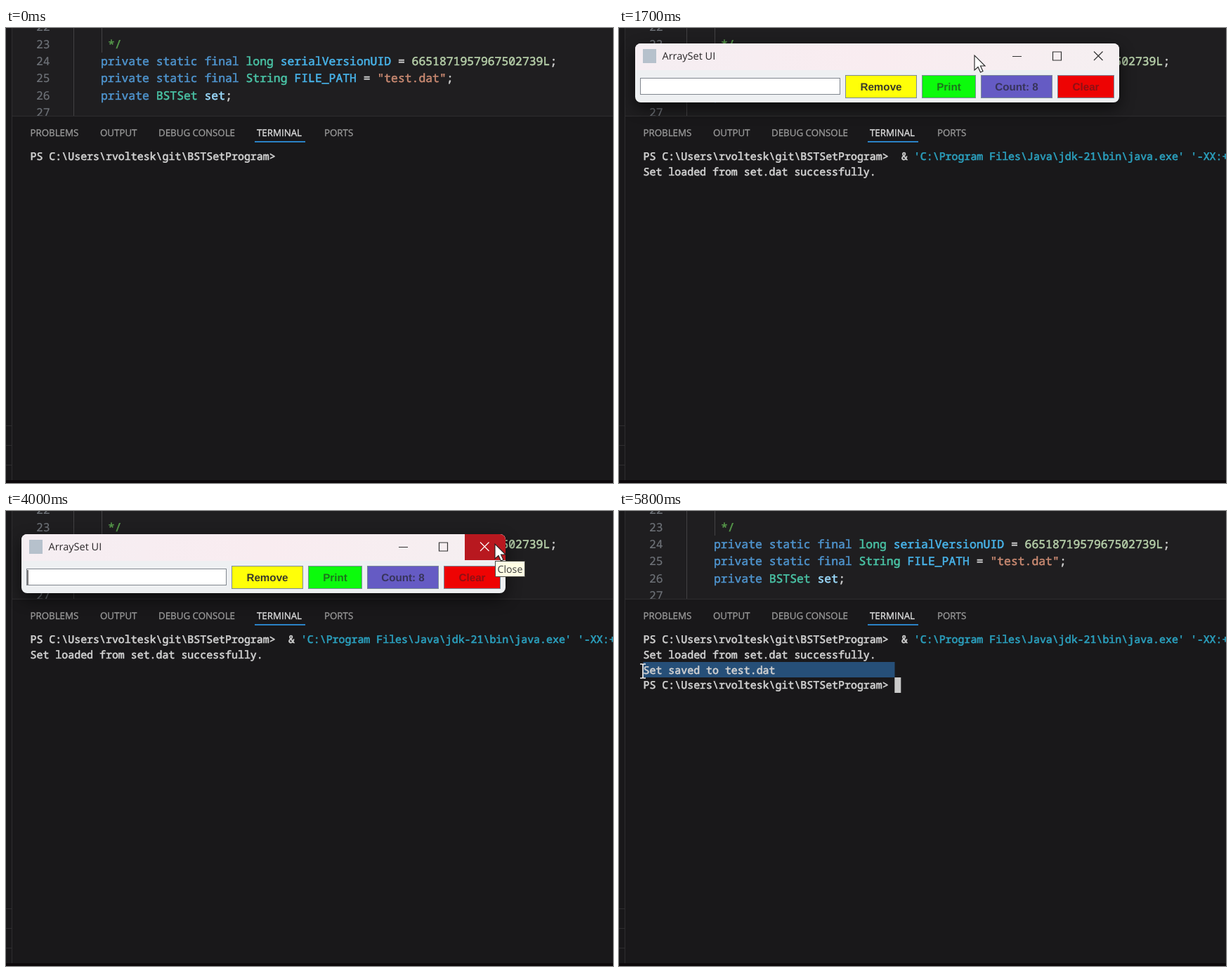
An HTML page for the animation above (5900 ms loop, 864 px wide and 648 px high).

```html
<!DOCTYPE html>
<html lang="en">
<head>
<meta charset="utf-8">
<title>Saving a set</title>
<style>
  html, body { margin: 0; width: 100%; height: 100%; overflow: hidden; background: #19181a; }
  svg { display: block; width: 864px; height: 648px; }
  text, tspan { fill: currentColor; stroke: currentColor; white-space: pre; }
  text { stroke-width: 0; text-rendering: geometricPrecision; }
  .code { font: 16.4px "Noto Sans Mono", "DejaVu Sans Mono", monospace; stroke-width: .55px; color: #d0d0d0; }
  .num { color: #6e7278; stroke-width: .2px; }
  .term { font: 14.93px "Noto Sans Mono", "DejaVu Sans Mono", monospace; color: #d0d0d0; }
  .term text { stroke-width: .65px; }
  .ui { font: 13.3px "Open Sans", "Noto Sans", sans-serif; color: #9b9b9b; }
  .tabs text { stroke-width: .3px; }
  .btn { font: bold 15.2px "Liberation Sans", Arial, sans-serif; text-anchor: middle; }
  .kw { color: #4f95cf; }
  .type { color: #4ac4a6; }
  .const { color: #48b4ea; }
  .var { color: #9cdcfe; }
  .lit { color: #b5cea8; }
  .str { color: #ca8a72; }
  .note { color: #56994a; }
  .arg { color: #2b9fbd; }
</style>
</head>
<body>
<svg viewBox="0 0 864 648">
  <defs>
    <filter id="soft" x="-20%" y="-80%" width="140%" height="260%"><feGaussianBlur stdDeviation="11"/></filter>
    <linearGradient id="bar"><stop stop-color="#f5eef2"/><stop offset=".5" stop-color="#f9ecf0"/><stop offset="1" stop-color="#f5eff1"/></linearGradient>
    <clipPath id="round"><rect width="689" height="84" rx="8"/></clipPath>
    <clipPath id="editor"><rect width="864" height="125"/></clipPath>
  </defs>

  <rect width="864" height="648" fill="#19181a"/>
  <rect x="9" width="855" height="125" fill="#1f1e20"/>
  <path d="M8.5 0V644M9 125.5H864M0 566.5H8M0 594.5H8M0 622.5H8" stroke="#2e2d2f"/>
  <rect y="644" width="864" height="4" fill="#0d090b"/>

  <g clip-path="url(#editor)">
    <path d="M96.5 0V125M136.5 0V35" stroke="#434244"/>
    <g id="numbers"></g>
    <text class="code note" x="145" y="28.7">*/</text>
    <text class="code" x="135" y="53"><tspan class="kw">private static final </tspan><tspan class="type">long </tspan><tspan class="const">serialVersionUID</tspan> = <tspan class="lit">6651871957967502739L</tspan>;</text>
    <text class="code" x="135" y="77.3"><tspan class="kw">private static final </tspan><tspan class="type">String </tspan><tspan class="const">FILE_PATH</tspan> = <tspan class="str">"test.dat"</tspan>;</text>
    <text class="code" x="135" y="101.6"><tspan class="kw">private </tspan><tspan class="type">BSTSet </tspan><tspan class="var">set</tspan>;</text>
  </g>

  <g class="ui tabs">
    <text x="34.5" y="154">PROBLEMS</text>
    <text x="134" y="154">OUTPUT</text>
    <text x="217" y="154">DEBUG CONSOLE</text>
    <text x="357" y="154" style="color:#e2e2e2">TERMINAL</text>
    <text x="453" y="154">PORTS</text>
  </g>
  <rect x="354" y="161" width="72" height="2" fill="#2b82c6"/>

  <rect id="selection" y="215" height="22" fill="#264f78"/>
  <g class="term">
    <text x="34.5" y="188.2">PS C:\Users\rvoltesk\git\BSTSetProgram&gt;</text>
    <text id="command" x="401.9" y="188.2">&amp; <tspan class="arg">'C:\Program Files\Java\jdk-21\bin\java.exe' '-XX:+ShowCode</tspan></text>
    <text id="loaded" x="34.5" y="209.9">Set loaded from set.dat successfully.</text>
    <text id="saved" x="34.5" y="231.6">Set saved to test.dat</text>
    <text id="prompt" x="34.5" y="253.3">PS C:\Users\rvoltesk\git\BSTSetProgram&gt;</text>
  </g>
  <rect id="block" width="9" height="22" fill="#cacaca"/>

  <g id="win">
    <rect y="8" width="689" height="84" rx="10" fill="#000" opacity=".6" filter="url(#soft)"/>
    <g clip-path="url(#round)">
      <rect width="689" height="84" fill="#eef0f2"/>
      <rect width="689" height="38" fill="url(#bar)"/>
      <rect id="hover" x="631" width="58" height="37" fill="#b8181f"/>
    </g>
    <rect x="11" y="8" width="19" height="20" fill="#b6c1cc"/>
    <text class="ui" x="38.5" y="23" style="font-size:14.5px;color:#2b2729">ArraySet UI</text>
    <g fill="none" stroke="#333" stroke-width="1.2">
      <path d="M537 18.5H550M594.5 12H606.5V24H594.5Z"/>
      <path id="cross" d="M653 11.5L665.5 24M665.5 11.5L653 24"/>
    </g>
    <rect x="7.5" y="49.5" width="284" height="23" fill="#fff" stroke="#80868e"/>
    <path id="caret" d="M9 51V72" stroke="#333" stroke-width="1.3"/>
    <g id="buttons"></g>
  </g>

  <g id="tip">
    <rect x="696.5" y="71.5" width="42" height="22" fill="#fffde4" stroke="#4a4a44"/>
    <text class="ui" x="699.5" y="87.5" style="font-size:14.2px;color:#3c3c3c">Close</text>
  </g>
  <path id="arrow" d="M0 0V21L5 16.5L8.5 24L12 22.5L8.5 15H15Z" fill="#fff" stroke="#222" stroke-width="1.1"/>
  <path id="beam" d="M-4 -10H-1L0 -9L1 -10H4M0 -9V9M-4 10H-1L0 9L1 10H4" fill="none" stroke="#f2f2f2" stroke-width="1.7"/>
</svg>
<script>
const LOOP = 5900, STEP = 100, LEFT = 34.5, CELL = 8.96, SEL_END = 392.5;
const $ = id => document.getElementById(id);
const show = (id, on) => { $(id).style.display = on ? '' : 'none'; };
const place = (id, x, y) => $(id).setAttribute('transform', `translate(${x} ${y})`);

// Rows of [time, x, y]
const winPath = [[600, 25, -125], [900, 25, -92], [1100, 25, -48], [1400, 24, -4], [1700, 23, 22], [2000, 23, 33], [2400, 22, 33]];
const mousePath = [
  [2000, 506.5, 50], [2600, 506.5, 50], [2900, 590, 46], [3200, 690, 46], [3400, 696, 47],
  [4300, 696, 47], [4600, 392, 224], [4700, 357, 223], [4800, 298, 222], [4900, 210, 223],
  [5100, 80, 225], [5300, 22, 226], [5600, 12, 228], [5800, 34, 228]
];

function track(rows, t) {
  const i = rows.findIndex(r => r[0] > t);
  if (i < 0) return rows[rows.length - 1].slice(1);
  if (i === 0) return rows[0].slice(1);
  const [t0, x0, y0] = rows[i - 1], [t1, x1, y1] = rows[i];
  const k = (t - t0) / (t1 - t0);
  return [x0 + (x1 - x0) * k, y0 + (y1 - y0) * k];
}

$('numbers').innerHTML = [22, 23, 24, 25, 26, 27]
  .map((n, i) => `<text class="code num" x="43" y="${4.4 + i * 24.3}">${n}</text>`).join('');

$('buttons').innerHTML = [
  [299, 102, '#ffff08', '#3a3a2c', 'Remove'],
  [408, 77, '#0cfb0c', '#1c741c', 'Print'],
  [492, 102, '#655bc4', '#37345a', 'Count: 8'],
  [601, 81, '#ee0303', '#8e1014', 'Clear']
].map(([x, w, fill, ink, label]) =>
  `<rect x="${x + .5}" y="45.5" width="${w - 1}" height="32" fill="${fill}" stroke="#7a8a99"/>
   <text class="btn" x="${x + w / 2}" y="67" style="color:${ink}">${label}</text>`).join('');

function draw(t) {
  show('command', t >= 200);
  show('loaded', t >= 500);
  show('saved', t >= 4200);
  show('prompt', t >= 4400);

  const starting = t >= 200 && t < 500;
  show('block', starting || t >= 4400);
  starting ? place('block', LEFT, 194) : place('block', 392.3, 237);

  const [wx, wy] = track(winPath, t);
  const fade = Math.max(0, Math.min(1, (4400 - t) / 200));
  show('win', t >= 700 && fade > 0);
  place('win', wx, wy);
  $('win').style.opacity = fade;
  show('caret', t % 900 >= 300 && t % 900 < 750);

  const hover = t >= 3200;
  show('hover', hover);
  $('cross').setAttribute('stroke', hover ? '#fff' : '#333');
  show('tip', t >= 3800 && t < 4200);

  const [mx, my] = t < 2000 ? [505.5 + Math.max(0, t - 1400) / 600, wy + 17] : track(mousePath, t);
  show('arrow', t >= 900 && t < 4400);
  show('beam', t >= 4400);
  place('arrow', mx, my);
  place('beam', mx, my);

  // The selection trails the pointer by one step and snaps to cells.
  const col = Math.round((track(mousePath, t - STEP)[0] - LEFT) / CELL);
  const start = LEFT + Math.max(0, Math.min(40, col)) * CELL;
  show('selection', t >= 4700);
  $('selection').setAttribute('x', start);
  $('selection').setAttribute('width', Math.max(0, SEL_END - start));
}

function frame() {
  draw(Math.floor(performance.now() % LOOP / STEP) * STEP);
  requestAnimationFrame(frame);
}
frame();
</script>
</body>
</html>
```
